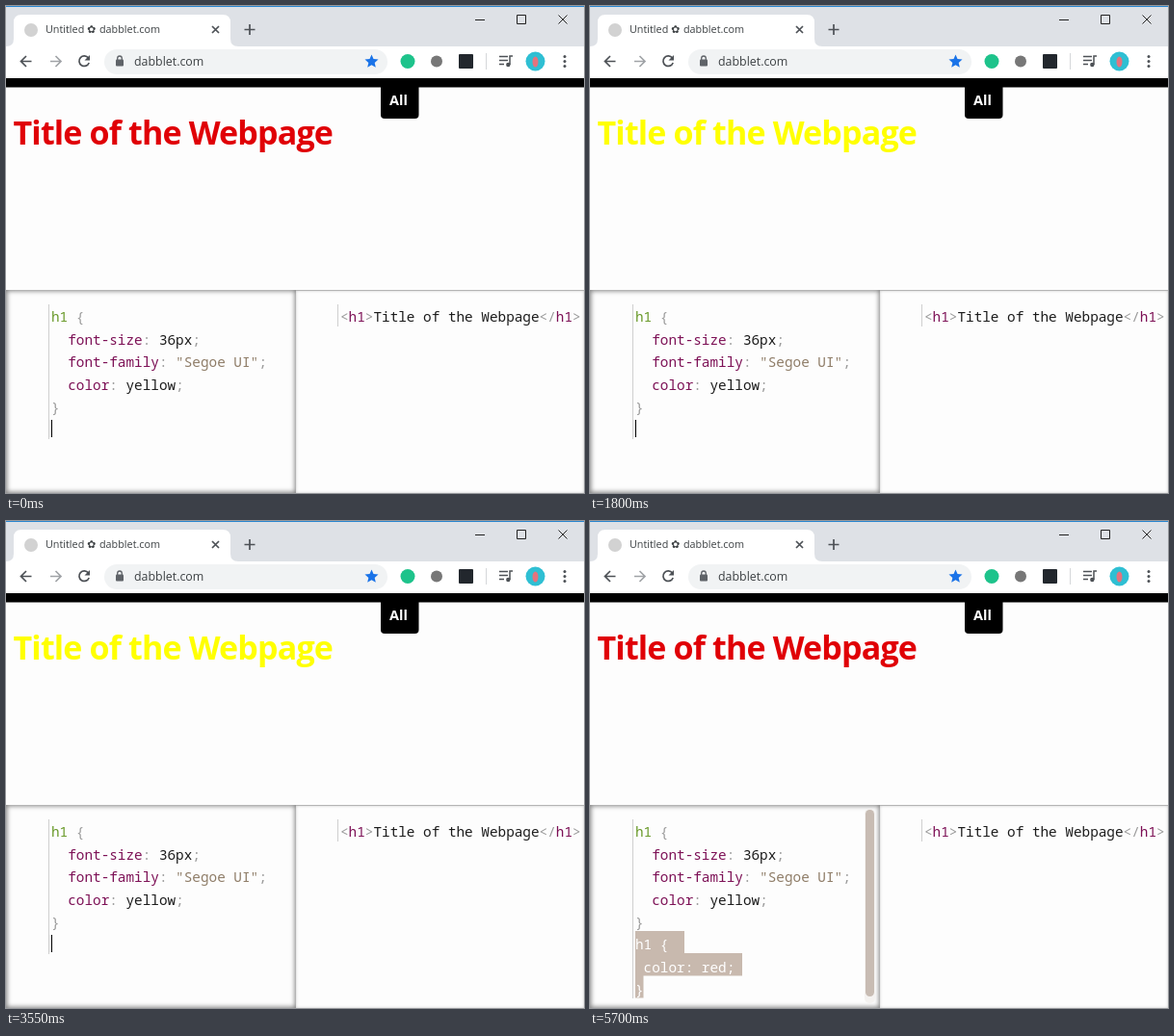
Recreate the animation shown at these times as an HTML page. Size 600 by 506 pixels, loop 5750 ms.

```html
<!DOCTYPE html>
<html lang="en">
<head>
<meta charset="utf-8">
<title>CSS cascade demo</title>
<style>
  html, body { margin: 0; width: 100%; height: 100%; overflow: hidden; background: #fdfdfd; }
  .stage { position: relative; width: 600px; height: 506px; overflow: hidden; }
  svg { position: absolute; left: 0; top: 0; }
  .pane { position: absolute; top: 295px; height: 211px; box-sizing: border-box; background: #fdfdfd; }
  .css { left: 0; width: 301px; box-shadow: inset 0 0 5px 1px rgba(0, 0, 0, .5); }
  .html { left: 301px; width: 299px; border-top: 1px solid #b4b4b4; box-shadow: inset 0 0 3px rgba(0, 0, 0, .22); }

  text { white-space: pre; }
  .ui { font-family: "Open Sans", "Noto Sans", sans-serif; fill: #3c4043; }
  .flower { font: 11px "DejaVu Sans", sans-serif; fill: #3c4043; }
  .code { font: 14.35px "Noto Sans Mono", "DejaVu Sans Mono", monospace; fill: #1c1c1c; }
  .sel { fill: #6a9a2a; }
  .pun { fill: #999; }
  .prop { fill: #7d1156; }
  .str { fill: #8f7d68; }
  .picked { fill: #fff; }
  .line { fill: none; stroke: #4d5156; stroke-width: 1.7; }
  .thin { fill: none; stroke: #222; stroke-width: 1; }

  .title { font: bold 34px "Open Sans", "Noto Sans", sans-serif; letter-spacing: -.84px; }
  .title, .rule, .caret { animation: 5750ms step-end infinite; }
  .rule { animation-name: rule; }
  .caret { animation-name: caret; }
  /* The preview follows the code 100 ms later. */
  .title { animation-name: preview; animation-delay: -5650ms; }

  @keyframes rule {
    0%, 26.957%, 56.522%, 80.87% { opacity: 0; }
    18.261%, 36.522%, 66.957%, 89.565%, 100% { opacity: 1; }
  }
  @keyframes preview {
    0%, 26.957%, 56.522%, 80.87% { fill: #ff0; }
    18.261%, 36.522%, 66.957%, 89.565%, 100% { fill: #e00006; }
  }
  @keyframes caret {
    0%, 26.957%, 56.522%, 80.87% { opacity: 1; }
    8.696%, 35.652%, 65.217%, 89.565%, 100% { opacity: 0; }
  }
</style>
</head>
<body>
<div class="stage">
  <div class="pane html"></div>
  <div class="pane css"></div>
  <svg width="600" height="506" viewBox="0 0 600 506">
    <!-- tab strip -->
    <rect width="600" height="42" fill="#dee1e6"/>
    <rect width="600" height="1" fill="#2a86cf"/>
    <path d="M0 42Q8 42 8 34V17Q8 9 16 9H225Q233 9 233 17V34Q233 42 241 42Z" fill="#fff"/>
    <circle cx="26" cy="25" r="7" fill="#d2d2d2"/>
    <g class="ui" font-size="10.8">
      <text x="41" y="28">Untitled</text>
      <text x="97" y="28">dabblet.com</text>
    </g>
    <text class="flower" x="84" y="28">✿</text>
    <path class="line" stroke-width="1.5" d="M214 21l7 7m0-7l-7 7M247.500 24.500h11m-5.500-5.500v11"/>
    <path class="thin" d="M487 14.500h10M530.500 9.500h9v9h-9zM573.500 9.500l9 9m0-9l-9 9"/>

    <!-- toolbar -->
    <rect y="42" width="600" height="33" fill="#fff"/>
    <rect x="102" y="45" width="294" height="26" rx="13" fill="#f1f3f4"/>
    <path class="line" d="M26.500 57.500h-11m5.500-5.500l-5.500 5.500l5.500 5.500"/>
    <path class="line" style="stroke:#a0a3a7" d="M46 57.500h11m-5.500-5.500l5.500 5.500l-5.500 5.500"/>
    <path class="line" d="M85.500 54A5.300 5.300 0 1 0 86.200 59"/>
    <path d="M87 51v5.500h-5.500z" fill="#4d5156"/>
    <rect x="114" y="55.500" width="8" height="7" rx="1" fill="#5f6368"/>
    <path class="line" style="stroke:#5f6368;stroke-width:1.300" d="M115.700 56v-1.700a2.300 2.300 0 0 1 4.600 0V56"/>
    <text class="ui" x="133" y="62" font-size="12.4">dabblet.com</text>
    <path d="M379.500 50.500l2 4.600 5 .5-3.800 3.300 1.100 4.900-4.300-2.600-4.300 2.600 1.100-4.900-3.800-3.300 5-.5z" fill="#1a73e8"/>
    <circle cx="417" cy="57.500" r="7.500" fill="#1ec38b"/>
    <circle cx="447" cy="57.500" r="6" fill="#777"/>
    <rect x="470" y="50" width="15" height="15" rx="1" fill="#22272d"/>
    <path d="M498.500 49v17" stroke="#d5d7da"/>
    <path class="line" style="stroke-width:1.500" d="M512 52.500h9M512 56.500h9M512 60.500h5M523 61v-9h3"/>
    <circle cx="521.300" cy="61" r="2.200" fill="#4d5156"/>
    <circle cx="549.500" cy="57.500" r="10" fill="#2fbfd3"/>
    <ellipse cx="549.500" cy="58" rx="3" ry="5.500" fill="#e5737d"/>
    <g fill="#4d5156">
      <circle cx="580" cy="52.500" r="1.500"/>
      <circle cx="580" cy="57.500" r="1.500"/>
      <circle cx="580" cy="62.500" r="1.500"/>
    </g>

    <!-- page preview -->
    <rect y="75" width="600" height="9.500" fill="#000"/>
    <path d="M389 84H428.500V113Q428.500 117 424.500 117H393Q389 117 389 113Z" fill="#000"/>
    <text class="ui" x="398" y="103" font-size="14.5" font-weight="bold" style="fill:#fff">All</text>
    <text class="title" x="7.500" y="144">Title of the Webpage</text>

    <!-- editors -->
    <path d="M44.500 310V450M344.500 310V333" stroke="#d0d0d0"/>
    <g class="code">
      <text x="47" y="328"><tspan class="sel">h1</tspan><tspan class="pun"> {</tspan></text>
      <text x="47" y="351.500"><tspan class="prop">  font-size</tspan><tspan class="pun">:</tspan> 36px<tspan class="pun">;</tspan></text>
      <text x="47" y="375"><tspan class="prop">  font-family</tspan><tspan class="pun">:</tspan><tspan class="str"> "Segoe UI"</tspan><tspan class="pun">;</tspan></text>
      <text x="47" y="398.500"><tspan class="prop">  color</tspan><tspan class="pun">:</tspan> yellow<tspan class="pun">;</tspan></text>
      <text x="47" y="422" class="pun">}</text>
      <text x="347" y="328"><tspan class="pun">&lt;</tspan><tspan class="prop">h1</tspan><tspan class="pun">&gt;</tspan>Title of the Webpage<tspan class="pun">&lt;/</tspan><tspan class="prop">h1</tspan><tspan class="pun">&gt;</tspan></text>
    </g>
    <rect class="caret" x="47" y="430" width="1" height="18" fill="#000"/>
    <g class="rule">
      <path d="M44.500 450V496" stroke="#d0d0d0"/>
      <path d="M47 426H98V449H158V472.500H55.500V495.500H47Z" fill="#c8b9ae"/>
      <g class="code picked">
        <text x="47" y="445">h1 {</text>
        <text x="47" y="468.500"> color: red;</text>
        <text x="47" y="492">}</text>
      </g>
      <rect x="285" y="299" width="11" height="202" rx="5" fill="#f4f2f0"/>
      <rect x="286" y="300" width="9" height="194" rx="4.500" fill="#c8bcb3"/>
    </g>
  </svg>
</div>
</body>
</html>
```
